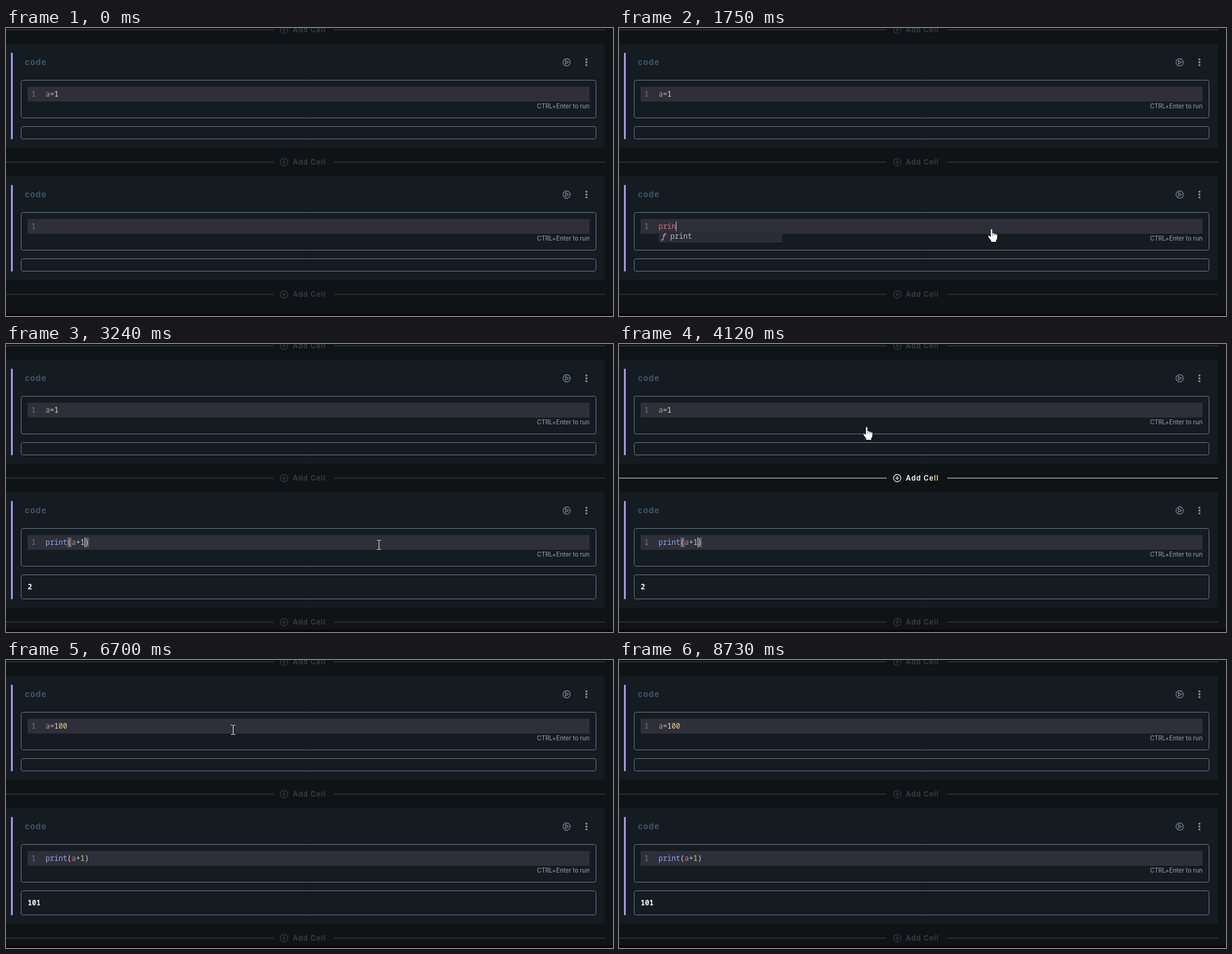
Animation, 982 px wide and 466 px high, one loop 8.79 s. Source, as an HTML page with a canvas:

```html
<!DOCTYPE html>
<html lang="en">
<head>
<meta charset="utf-8">
<title>Reactive notebook</title>
<style>
  html, body { margin: 0; width: 100%; height: 100%; overflow: hidden; background: #101315; }
  canvas { display: block; width: 982px; height: 466px; }
</style>
</head>
<body>
<canvas id="stage" width="982" height="466"></canvas>
<script>
const ctx = document.getElementById('stage').getContext('2d');
const LOOP = 8790;
const CHAR = 7.02;
const CODE_X = 64;
const MONO = '500 11.7px "Noto Sans Mono", monospace';
const SANS = 'Inter, sans-serif';
const RED = '#e0736f', BLUE = '#82aaff', CYAN = '#89ddff', YELLOW = '#e6d37c', PALE = '#d5d7e0';

// [time, value] lists: the last entry already reached is the current one
const typed = [
  [0, ''], [1290, 'p'], [1480, 'pr'], [1610, 'pri'], [1680, 'prin'], [1810, 'print'],
  [1940, 'print()'], [2140, 'print(a)'], [2540, 'print(a+)'], [2810, 'print(a+1)']
];
const value = [[0, '1'], [5910, '10'], [6030, '100']];
const output = [[0, ''], [3240, '2'], [6500, '101']];
const popup = [
  [0, null],
  [1415, { x: 64, items: ['pass', 'pow', 'print', 'property', 'compile', 'help', 'input'] }],
  [1480, { x: 64, items: ['print', 'property', 'copyright'] }],
  [1610, { x: 64, items: ['print'] }],
  [1940, null],
  [2600, { x: 120, items: ['a', 'abs', 'all', 'any', 'ascii'] }],
  [2870, null]
];
const caretOn = [
  [0, 0], [735, 1], [1220, 0], [1290, 1], [3440, 0], [3975, 1], [4520, 0],
  [4915, 1], [5510, 0], [5910, 1], [6700, 0], [7300, 1], [7830, 0], [8450, 1], [8725, 0]
];
const lit = [[0, -1], [4110, 1], [4185, -1], [7695, 1], [7765, -1], [7970, 2], [8185, -1]];

// Pointer runs: each moves through its points in equal steps, then rests
const runs = [
  { from: 70, to: 740, path: [
    [784, 419, 'hand'], [755, 398, 'hand'], [722, 372, 'hand'], [690, 350, 'beam'], [662, 336, 'beam'],
    [640, 327, 'beam'], [619, 321, 'beam'], [610, 322, 'beam'], [605, 324, 'beam'], [603, 325, 'beam']] },
  { from: 1415, to: 1415, path: [[603, 325, 'hand']] },
  { from: 2205, to: 2205, path: [[603, 325, 'beam']] },
  { from: 2540, to: 2540, path: [[603, 325, 'hand']] },
  { from: 2870, to: 2870, path: [[603, 325, 'beam']] },
  { from: 3910, to: 4320, path: [
    [590, 317, 'beam'], [545, 290, 'hand'], [495, 250, 'hand'], [401, 134, 'hand'],
    [389, 102, 'hand'], [382, 79, 'hand'], [379, 68, 'hand']] },
  { from: 4520, to: 4720, path: [[378, 74, 'hand'], [376, 89, 'hand'], [374, 99, 'beam'], [372, 105, 'beam']] },
  { from: 4920, to: 5050, path: [[369, 110, 'beam'], [367, 113, 'beam']] },
  { from: 7560, to: 8320, path: [
    [400, 117, 'beam'], [505, 132, 'hand'], [645, 160, 'hand'], [823, 339, 'beam'], [846, 380, 'hand'],
    [855, 412, 'hand'], [858, 436, 'hand'], [859, 446, 'hand'], [858, 453, 'hand'],
    [856, 459, 'hand'], [854, 464, 'hand'], null] }
];

function at(list, t) {
  let v = list[0][1];
  for (const [time, next] of list) if (t >= time) v = next;
  return v;
}

function pointer(t) {
  const run = runs.filter(r => t >= r.from - 5).pop();
  if (!run) return null;
  const last = run.path.length - 1;
  const step = last ? (run.to - run.from) / last : 1;
  return run.path[Math.min(last, Math.max(0, Math.floor((t - run.from + 5) / step)))];
}

function text(str, x, y, font, fill, spacing = 0, align = 'left') {
  ctx.font = font;
  ctx.fillStyle = fill;
  ctx.letterSpacing = spacing + 'px';
  ctx.textAlign = align;
  ctx.fillText(str, x, y);
}

function rect(x, y, w, h, fill) {
  ctx.fillStyle = fill;
  ctx.fillRect(x, y, w, h);
}

function frame(x, y, w, h) {
  ctx.beginPath();
  ctx.roundRect(x + .5, y + .5, w - 1, h - 1, 3);
  ctx.strokeStyle = '#65768a';
  ctx.lineWidth = 1;
  ctx.stroke();
}

function circle(x, y, r) {
  ctx.beginPath();
  ctx.arc(x, y, r, 0, Math.PI * 2);
}

function addCell(y, on) {
  const color = on ? '#ffffff' : '#33414d';
  const line = on ? '#777b80' : '#242c35';
  rect(0, y - 1, 433, 2, line);
  rect(531, y - 1, 438, 2, line);
  ctx.strokeStyle = color;
  ctx.lineWidth = 1.1;
  circle(450, y, 5.9);
  ctx.moveTo(447, y); ctx.lineTo(453, y);
  ctx.moveTo(450, y - 3); ctx.lineTo(450, y + 3);
  ctx.stroke();
  const fill = ctx.createLinearGradient(464, 0, 518, 0);
  fill.addColorStop(.72, color);
  fill.addColorStop(.9, on ? '#f0dc94' : '#3d4038');
  text('Add Cell', 464, y + 4, '600 11.2px ' + SANS, fill, 1);
}

function codeLine(tokens, top) {
  let x = CODE_X;
  for (const [str, color] of tokens) {
    text(str, x, top + 16, MONO, color);
    x += str.length * CHAR;
  }
}

function caret(col, top) {
  rect(Math.round(CODE_X + col * CHAR), top + 4, 1, 16, '#b7bbcf');
}

function cell(y, result) {
  const grow = result ? 19 : 0;
  ctx.fillStyle = '#141b21';
  ctx.beginPath();
  ctx.roundRect(-6, y, 975, 169 + grow, 4);
  ctx.fill();
  ctx.fillStyle = '#a894e6';
  ctx.beginPath();
  ctx.roundRect(8, y + 15, 3, 140 + grow, 1);
  ctx.fill();
  text('code', 30.5, y + 35, '700 13px ' + SANS, '#40546a', 1);

  ctx.strokeStyle = ctx.fillStyle = '#8292a1';
  ctx.lineWidth = 1.1;
  circle(907, y + 30.5, 5.9);
  ctx.moveTo(905, y + 27.6);
  ctx.lineTo(910.2, y + 30.5);
  ctx.lineTo(905, y + 33.4);
  ctx.closePath();
  ctx.stroke();
  for (const d of [-4.6, 0, 4.6]) {
    circle(939, y + 30.5 + d, 1.7);
    ctx.fill();
  }

  frame(24, y + 59, 931, 62);
  rect(35, y + 70, 909, 24, '#2f2f39');
  text('1', 41, y + 86, MONO, '#668296');
  text('CTRL+Enter to run', 944, y + 105, '500 9.8px ' + SANS, '#85929e', -.05, 'right');
  frame(24, y + 134, 931, 21 + grow);
  if (result) text(result, 35, y + 158, MONO.replace('500', '600'), '#f4f5f7');
}

function printTokens(src) {
  if (src.length < 5) return [[src, RED]];
  const tint = { '(': '#cfd3dc', ')': '#cfd3dc', a: RED, '+': CYAN, '1': YELLOW };
  return [[src.slice(0, 5), BLUE], ...[...src.slice(5)].map(c => [c, tint[c]])];
}

function drawPopup({ x, items }) {
  rect(x, 330, 200, 17.1 * items.length - .5, '#363941');
  rect(x, 330, 200, 15.5, '#292c35');
  items.forEach((item, i) => {
    const y = 341 + i * 17.2;
    if (item !== 'a') text('ƒ', x + 4, y, 'italic ' + MONO, '#c4c8cf');
    text(item, x + 19, y, MONO, i ? '#f4f5f7' : '#b4b8c0');
  });
}

function drawBeam(x, y) {
  const bars = [[-3, -8, 3, 1], [1, -8, 3, 1], [0, -7, 1, 14], [-3, 7, 3, 1], [1, 7, 3, 1]];
  for (const [dx, dy, w, h] of bars) rect(x + dx - .5, y + dy - .5, w + 1, h + 1, '#15181c');
  for (const [dx, dy, w, h] of bars) rect(x + dx, y + dy, w, h, '#ffffff');
}

const handShape = new Path2D(
  'M-2 1.5Q-2-.2-.4-.2T1.3 1.5V7Q2.8 5.8 4.1 7.5Q5.8 6.7 6.8 8.3Q9.3 7.8 9.4 10.5V14' +
  'Q9.2 17 7.5 18.5V21.5H-1.4V19.2Q-3.3 16.8-6 12.8Q-6.6 11.1-5.1 10.5Q-3.8 10.4-2 12.6Z');

function drawHand(x, y) {
  ctx.save();
  ctx.translate(x, y);
  ctx.fillStyle = '#ffffff';
  ctx.strokeStyle = '#0c0d0f';
  ctx.lineWidth = 1;
  ctx.fill(handShape);
  ctx.stroke(handShape);
  ctx.beginPath();
  for (const fx of [1.4, 4.2, 6.8]) {
    ctx.moveTo(fx, 8);
    ctx.lineTo(fx, 11);
  }
  ctx.lineWidth = .6;
  ctx.stroke();
  ctx.restore();
}

function draw(t) {
  const src = at(typed, t);
  const num = at(value, t);
  const result = at(output, t);
  const hot = at(lit, t);
  const inFirst = t >= 4915;

  rect(0, 0, 982, 466, '#101315');
  rect(0, 462, 982, 4, '#0b070b');
  addCell(3, false);
  addCell(217, hot === 1);
  addCell(result ? 450 : 431, hot === 2);

  cell(25, '');
  codeLine([['a', '#aaa079'], ['=', '#c49be8'], ['1', '#e9e6e2'], [num.slice(1), YELLOW]], 95);

  cell(239, result);
  if (src.includes('(') && !inFirst) {
    for (const col of [5, src.length - 1]) rect(CODE_X + col * CHAR, 313, 7, 16, '#575963');
  }
  codeLine(printTokens(src), 309);

  if (at(caretOn, t)) {
    if (inFirst) caret(2 + num.length, 95);
    else caret(src.endsWith(')') ? src.length - 1 : src.length, 309);
  }

  const list = at(popup, t);
  if (list) drawPopup(list);

  const p = pointer(t);
  if (p) (p[2] === 'hand' ? drawHand : drawBeam)(p[0], p[1]);
}

const start = performance.now();
function tick() {
  draw((performance.now() - start) % LOOP);
  requestAnimationFrame(tick);
}
tick();
</script>
</body>
</html>
```
